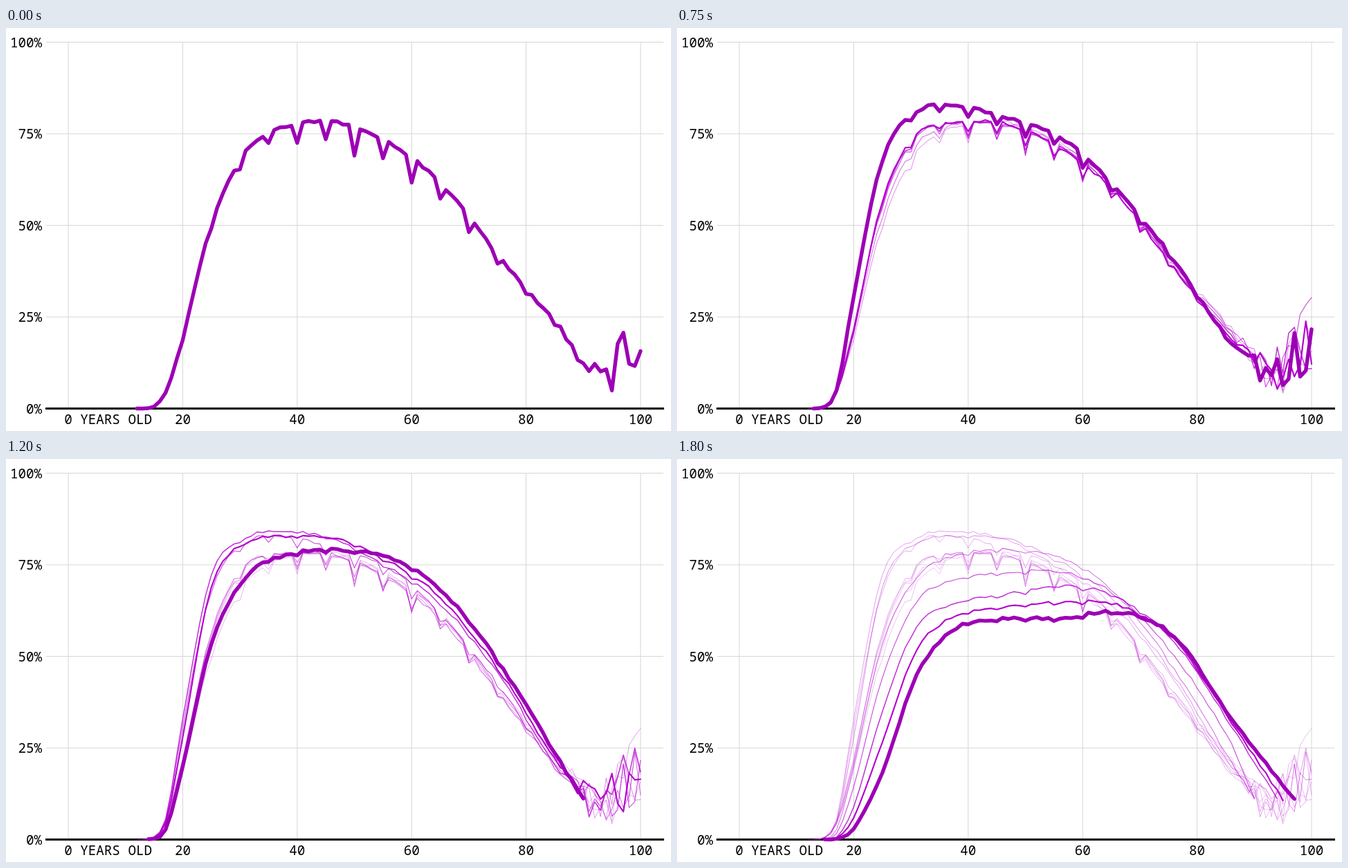
An HTML page that plays this animation: 961x583 px, repeating every 3.8 s.

```html
<!DOCTYPE html>
<html lang="en">
<head>
<meta charset="utf-8">
<title>Share by age</title>
<style>
  html, body { margin: 0; width: 100%; height: 100%; overflow: hidden; background: #fff; }
  svg { display: block; width: 961px; height: 583px; }
  text { font: 500 19.2px "Noto Sans Mono", "DejaVu Sans Mono", monospace; fill: #000; white-space: pre; }
  .grid { stroke: #d6d6d6; stroke-width: 1; }
  .axis { stroke: #000; stroke-width: 3; }
  .curve { fill: none; stroke-linecap: round; stroke-linejoin: round; }
</style>
</head>
<body>
<svg id="chart" viewBox="0 0 961 583"></svg>
<script>
const STEP = 150, LOOP = 3800, COUNT = 13, NOISY = 8;
const svg = document.getElementById('chart');
const X = age => 90 + age * 8.27;
const Y = pct => 550.5 - pct * 5.3;

function add(tag, attrs, text) {
  const el = document.createElementNS('http://www.w3.org/2000/svg', tag);
  for (const k in attrs) el.setAttribute(k, attrs[k]);
  if (text) el.textContent = text;
  return svg.appendChild(el);
}
const line = (cls, x1, y1, x2, y2) => add('line', { class: cls, x1, y1, x2, y2 });

// Key percentages at these ages for a few curves; the others are blended.
const AGES = [17, 20, 25, 31, 38, 47, 57, 66, 76, 86];
const KEYS = {
  0: [4.3, 19.5, 50.3, 70.2, 77, 78, 71.8, 59.8, 40, 22],
  2: [5, 22.8, 55.5, 74.2, 78, 77, 70.5, 60.2, 39, 21],
  4: [4.2, 21.5, 57, 74.8, 78.2, 77.5, 70.2, 58.5, 38.3, 19],
  5: [5, 31, 68, 81, 82.3, 79.3, 73, 60, 40.5, 18],
  6: [5.5, 33, 72.3, 82.2, 84.3, 81.4, 73.4, 62.9, 43.3, 18],
  7: [4.5, 28, 69, 81, 82.8, 82, 75, 64.5, 44.5, 20],
  8: [2.7, 20, 53.5, 71.5, 77.6, 79.1, 76.5, 66.7, 46.5, 21],
  10: [.6, 9, 35, 58.3, 64.5, 67, 69.2, 66.2, 54, 31],
  12: [.2, 3, 18.3, 45, 57.9, 60.3, 60.6, 62.1, 55.5, 32.8]
};
const keysFor = i => KEYS[i] || KEYS[i - 1].map((v, k) => (v + KEYS[i + 1][k]) / 2);

function random(seed) {
  return () => {
    seed = seed + 0x6D2B79F5 | 0;
    let t = Math.imul(seed ^ seed >>> 15, 1 | seed);
    t = t + Math.imul(t ^ t >>> 7, 61 | t) ^ t;
    return ((t ^ t >>> 14) >>> 0) / 2 ** 31 - 1;
  };
}

// Cubic through the knots with finite-difference slopes.
function spline(xs, ys) {
  const n = xs.length - 1;
  const slope = i => {
    const a = Math.max(0, i - 1), b = Math.min(n, i + 1);
    return (ys[b] - ys[a]) / (xs[b] - xs[a]);
  };
  return x => {
    let i = 0;
    while (i < n - 1 && x > xs[i + 1]) i++;
    const h = xs[i + 1] - xs[i], t = (x - xs[i]) / h, u = 1 - t;
    return u * u * (1 + 2 * t) * ys[i] + t * t * (3 - 2 * t) * ys[i + 1]
      + h * t * u * (u * slope(i) - t * slope(i + 1));
  };
}

// Round ages drop below the trend, most of all in mid-life.
function dip(age) {
  if (age % 5) return 0;
  return (age % 10 ? 5 : 7) * Math.exp(-(((age - 53) / 22) ** 2));
}

function shape(i) {
  const noisy = i < NOISY, rnd = random(i + 1);
  const start = 12 + Math.min(3, Math.floor(i / 2.7));
  const end = noisy ? 100 : i < 10 ? 90 : Math.floor(79 + 1.5 * i);
  const tail = noisy ? [[93, 10], [100, 20]] : [[end, 11]];
  const trend = spline([12, 14, ...AGES, ...tail.map(p => p[0])],
                       [0, .1, ...keysFor(i), ...tail.map(p => p[1])]);
  const depth = i < 6 ? 1.1 - .11 * i : .1;
  const pts = [];
  for (let age = start; age <= end; age++) {
    const spread = age < 28 ? 0 : noisy && age > 86 ? 1 + .7 * (age - 86) : .4;
    const pct = trend(age) - depth * dip(age) + spread * rnd();
    pts.push(X(age).toFixed(1) + ',' + Y(Math.max(0, pct)).toFixed(1));
  }
  return 'M' + pts.join('L');
}

for (const pct of [25, 50, 75, 100]) line('grid', 58, Y(pct), 950, Y(pct));
for (let age = 0; age <= 100; age += 20) {
  line('grid', X(age), 20.5, X(age), 550);
  if (age) add('text', { x: X(age), y: 573, 'text-anchor': 'middle' }, String(age));
}
add('text', { x: 84.3, y: 573 }, '0 YEARS OLD');
for (let pct = 0; pct <= 100; pct += 25) {
  add('text', { x: 52, y: Y(pct) + 7, 'text-anchor': 'end' }, pct + '%');
}
line('axis', 57, 550.5, 951, 550.5);

const paths = Array.from({ length: COUNT }, (_, i) => add('path', { class: 'curve', d: shape(i) }));

// Newest curve is bold; earlier ones thin out and fade.
function show(step) {
  paths.forEach((p, i) => {
    const back = step - i, s = p.style;
    s.display = back < 0 ? 'none' : '';
    if (back < 0) return;
    s.stroke = back ? '#b400cd' : '#9d00b5';
    s.strokeWidth = back ? Math.max(.8, 2.1 / Math.sqrt(back)) : 5.4;
    s.strokeOpacity = back ? Math.min(1, 1.2 / back ** .55) : 1;
  });
}

const t0 = performance.now();
let shown = -1;
function tick() {
  const t = (performance.now() - t0) % LOOP;
  const step = Math.min(COUNT - 1, Math.floor(t / STEP));
  if (step !== shown) show(shown = step);
  requestAnimationFrame(tick);
}
tick();
</script>
</body>
</html>
```
